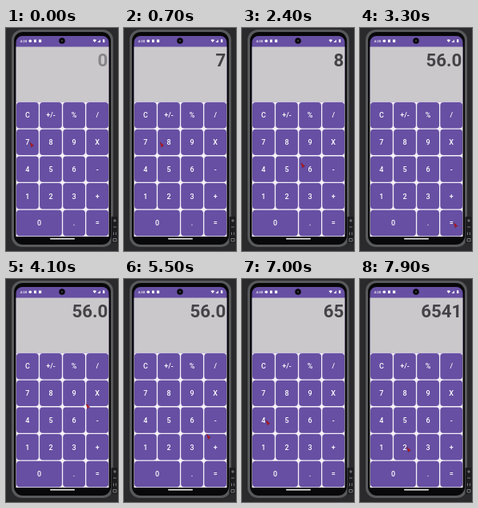
An HTML page for the animation above (8 s loop, 140 by 279 pixels).

```html
<!DOCTYPE html>
<html lang="en">
<head>
<meta charset="utf-8">
<title>Calculator</title>
<style>
  html, body { margin: 0; width: 100%; height: 100%; overflow: hidden; background: #2a2a2c; }
  svg { display: block; width: 140px; height: 279px; font-family: Roboto, sans-serif; }
  #keys text { font-size: 9px; font-weight: 500; fill: #fff; text-anchor: middle; }
  #display { font-size: 22.3px; font-weight: 700; text-anchor: end; }
</style>
</head>
<body>
<svg viewBox="0 0 140 279">
  <!-- phone body -->
  <rect x="7" y="2" width="127" height="272" rx="13" fill="#58595b"/>
  <rect x="10" y="5" width="121" height="266" rx="11" fill="#08080a"/>

  <!-- emulator toolbar -->
  <rect x="131.5" y="236" width="8" height="33" rx="1" fill="#1c1c1e"/>
  <path d="M134 241h4M136 239v4M134 249h4M134.5 255.5v3.5M137.5 255.5v3.5M134 263.5h4v3.5h-4z"
        fill="none" stroke="#a0a2a6" stroke-width=".7"/>

  <!-- screen -->
  <path d="M12.5 93V18a8 8 0 0 1 8-8h100a8 8 0 0 1 8 8v75z" fill="#674fa3"/>
  <rect x="12.5" y="23.5" width="116" height="69" fill="#cac8cb"/>
  <rect x="12.5" y="92.5" width="116" height="168.5" fill="#f5f1f8"/>
  <circle cx="70" cy="16" r="3.8" fill="#08080a"/>
  <circle cx="70" cy="16" r="1.2" fill="#3a3a40"/>
  <g fill="#fff">
    <text x="17.5" y="18" font-size="4.4" font-weight="500">4:20</text>
    <circle cx="30.3" cy="16.3" r="1.8"/>
    <path d="M35 14.5h2.8v3.5H35zM41 14.5h3.2v3.5H41z"/>
    <path d="M108.5 15q2.3-1.6 4.6 0l-2.3 3zM114.5 18l3.4-3.6V18zM121 14.3h2.3v3.8H121z"/>
  </g>
  <text id="display" x="127.4" y="48"></text>
  <g id="keys"></g>
  <rect x="55" y="263" width="31" height="1.5" rx=".7" fill="#eee"/>
  <path id="cursor" d="M0 0L4.8 4.3 2.8 4.8 2 6.4z" fill="#c8141a" stroke="#5a1528" stroke-width=".4"/>
</svg>
<script>
const LOOP = 8000;
const $ = id => document.getElementById(id);

// Keypad: a space leaves room for the double-width zero
const rows = ['C ± % /', '7 8 9 X', '4 5 6 -', '1 2 3 +', '0  . ='];
const keyCentres = {};
rows.forEach((line, row) => line.split(' ').forEach((label, col) => {
  if (!label) return;
  const x = 13 + col * 29.1, y = 93 + row * 33.7;
  const w = (label === '0' ? 2 : 1) * 29.1 - 1.3;
  keyCentres[label] = [x + w / 2, y + 16.2];
  $('keys').innerHTML += `<rect x="${x}" y="${y}" width="${w}" height="32.4" rx="4" fill="#674fa3"/>
    <text x="${x + w / 2}" y="${y + 19.4}">${label === '±' ? '+/-' : label}</text>`;
}));

// [time, key]; an empty key is a pause between the keys
const presses = [[400, '7'], [1200, 'X'], [1850, '8'], [2950, '='], [4050, ''], [4500, 'X'],
                 [5100, '+'], [5850, '6'], [6400, '5'], [7050, '4'], [7500, '1'], [LOOP, '2']];

function reading(t) {
  let text = '0', fresh = true, operand = 0;
  for (const [time, key] of presses) {
    if (time > t) break;
    if (/\d/.test(key)) {
      text = fresh ? key : text + key;
      fresh = false;
    } else if (key) {
      if (key === '=') text = (operand * text).toFixed(1);
      else operand = text;
      fresh = true;
    }
  }
  return text;
}

const ease = p => p * p * (3 - 2 * p);

function tip(key) {
  const [x, y] = key ? keyCentres[key] : [97, 156];
  return [x + 3, y];
}

// Rest after each press, then glide over just before the next one
function pointer(t) {
  const i = presses.findIndex(([time]) => time > t);
  const [time, key] = presses[i];
  const [lastTime, lastKey] = presses[i - 1] || [0, key];
  const arrive = time - 80, leave = Math.max(lastTime + 150, arrive - 700);
  const p = ease(Math.min(1, Math.max(0, (t - leave) / (arrive - leave))));
  const from = tip(lastKey), to = tip(key);
  return from.map((v, axis) => v + (to[axis] - v) * p);
}

function draw(t) {
  const text = reading(t);
  $('display').textContent = text;
  $('display').setAttribute('fill', text === '0' ? '#87858a' : '#454348');
  $('cursor').setAttribute('transform', `translate(${pointer(t)})`);
}

const start = performance.now();
function tick() {
  draw((performance.now() - start) % LOOP);
  requestAnimationFrame(tick);
}
tick();
</script>
</body>
</html>
```
